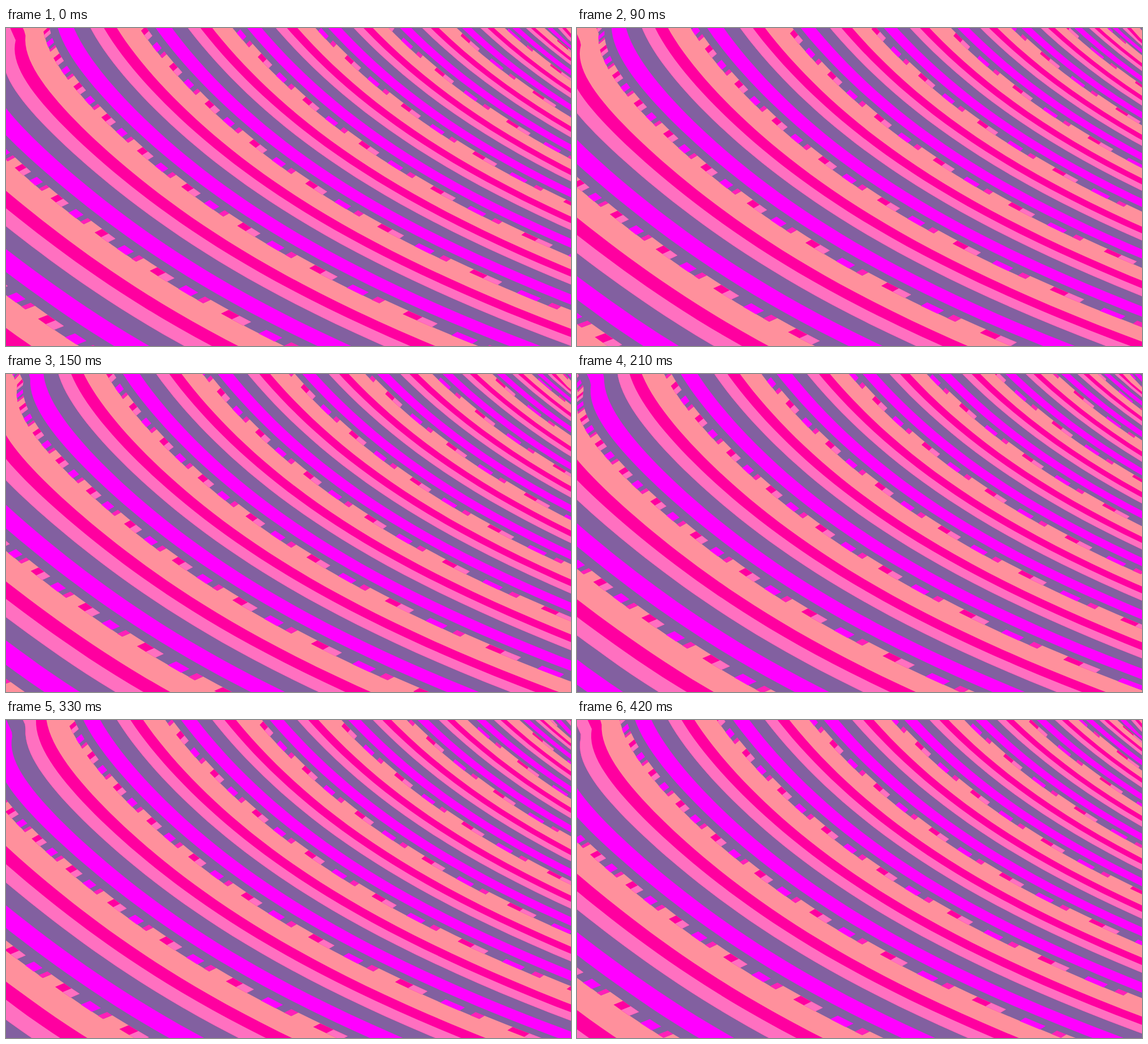
Write an HTML page that moves like this. It is 998x561 px and loops after 450 ms.

```html
<!DOCTYPE html>
<html lang="en">
<head>
<meta charset="utf-8">
<title>Woven arcs</title>
<style>
html, body { margin: 0; width: 100%; height: 100%; overflow: hidden; background: #8260a0; }
svg { display: block; width: 100vw; height: 100vh; }
</style>
</head>
<body>
<svg id="stage" viewBox="0 0 998 561" preserveAspectRatio="none"></svg>
<script>
const LOOP = 450, STEP = 30;
const HALF = 0.0375;            // half width of the woven seam
const R_MIN = -7, R_MAX = 5.2, X_MAX = 5;

// Bands across one period, painted in order so neighbours overlap.
const bands = [
  { fill: '#ff909c', from: HALF, to: 0.53 },
  { fill: '#ff00a0', from: 0.265, to: 0.53 },
  { fill: '#ff70c0', from: 0.395, to: 0.53 },
  { fill: '#ff00ff', from: 0.7, to: 0.87 },
  { fill: '#ff20b8', from: -HALF, to: HALF, seamOnly: true }
];

const stage = document.getElementById('stage');
for (const band of bands) {
  band.path = document.createElementNS('http://www.w3.org/2000/svg', 'path');
  band.path.setAttribute('fill', band.fill);
  stage.append(band.path);
}

// Two crossing families of arcs (b, w) laid on the flared surface.
function project(b, w) {
  const r = b + w, q = (w - b) / 2;
  const size = 209.5 * Math.exp(0.1222 * r + 0.002 * r * r);
  const flare = Math.max(0.003, 0.011 - 0.0005 * (r + 1) ** 2);
  const x = 504 + size * q * (1 + flare * q * q);
  const y = 252 + 73.2 * r + 0.25 * r ** 3 + (7.5 - 0.7 * r) * q * q;
  return x.toFixed(2) + ' ' + y.toFixed(2);
}

function ribbon(b0, b1, w0, w1) {
  const n = Math.max(1, Math.ceil((w1 - w0) / 0.2));
  const near = [], far = [];
  for (let i = 0; i <= n; i++) {
    const w = w0 + (w1 - w0) * i / n;
    near.push(project(b0, w));
    far.unshift(project(b1, w));
  }
  return 'M' + near.concat(far).join('L') + 'Z';
}

const lowest = b => Math.max(R_MIN - b, b - 2 * X_MAX);
const highest = b => Math.min(R_MAX - b, b + 2 * X_MAX);

function outline(band, shift) {
  let d = '';
  for (let i = -10; i <= 6; i++) {
    const b = i + shift, lo = lowest(b), hi = highest(b);
    if (hi <= lo) continue;
    if (!band.seamOnly) d += ribbon(b + band.from, b + band.to, lo, hi);
    for (let j = -10; j <= 6; j++) {
      const w = j + shift;
      if (w < lo || w > hi) continue;
      d += ribbon(b - HALF, b + HALF + 0.002, w + band.from, w + band.to);
    }
  }
  return d;
}

function draw(time) {
  const shift = Math.floor(time % LOOP / STEP) * STEP / LOOP;
  for (const band of bands) band.path.setAttribute('d', outline(band, shift));
}

let start = null, shown = -1;
function tick(now) {
  if (start === null) start = now;
  const count = Math.floor((now - start) / STEP);
  if (count !== shown) {
    shown = count;
    draw(now - start);
  }
  requestAnimationFrame(tick);
}
draw(0);
requestAnimationFrame(tick);
</script>
</body>
</html>
```
